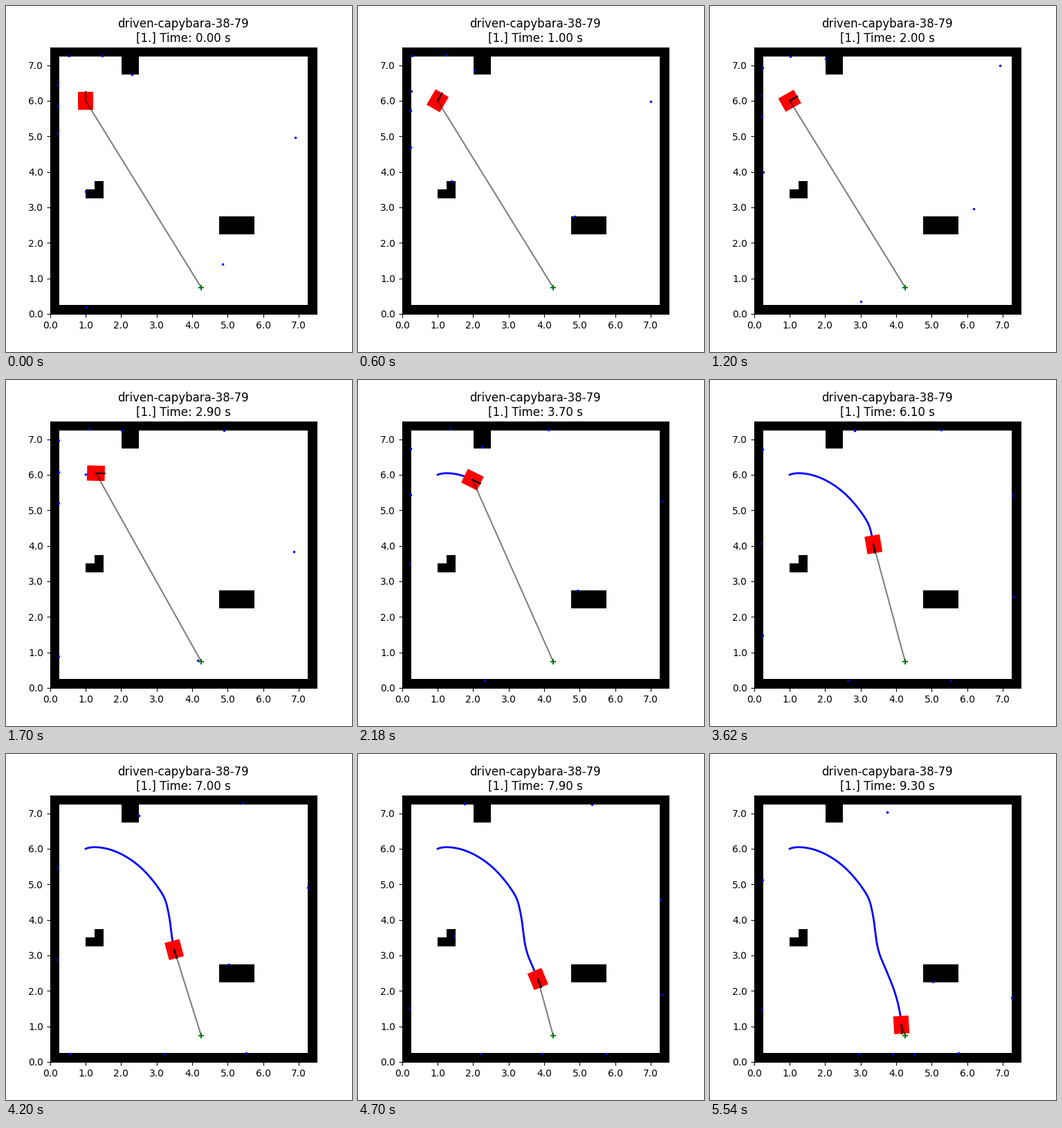
Animation of 500 by 500 pixels, one loop 5.56 s. Source, as a matplotlib script:

```python
import numpy as np
import matplotlib.pyplot as plt
from matplotlib.animation import FuncAnimation
from matplotlib.patches import Polygon

CELL, SIZE = 0.25, 30
STEPS, TICK_MS, LOOP_MS = 94, 20, 5560
DT, SUBSTEPS = 0.1, 20
MAX_RANGE, RAY_STEP = 6.0, 0.05
LENGTH, WIDTH = 0.5, 0.43
START, GOAL = (1.0, 6.0), (4.25, 0.75)
TOP_SPEED = 0.99

# heading in degrees at the moments where the turn rate changes
TURNS = {0: 90, 2: 29.5, 2.9: -1.5, 3.7: -26.5, 4.6: -46.6, 5.35: -58, 5.7: -76,
         6.35: -83.5, 6.75: -82, 7.3: -67, 7.9: -67.3, 8.4: -73, 9.3: -86.2}


def smoothstep(t, start, end):
    s = np.clip((t - start) / (end - start), 0, 1)
    return s * s * (3 - 2 * s)


def heading_at(t):
    return np.radians(np.interp(t, list(TURNS), list(TURNS.values())))


def speed_at(t):
    """Speed up after the first turn, brake a little before the goal."""
    return TOP_SPEED * (smoothstep(t, 1.8, 3.55) - 0.25 * smoothstep(t, 8.9, 9.3))


def drive():
    """Integrate speed and heading to one position per step."""
    dt = DT / SUBSTEPS
    mid = (np.arange((STEPS - 1) * SUBSTEPS) + 0.5) * dt
    h, dist = heading_at(mid), speed_at(mid) * dt
    return [start + np.append(0, np.cumsum(dist * along(h)))[::SUBSTEPS]
            for start, along in zip(START, (np.cos, np.sin))]


def build_map():
    grid = np.ones((SIZE, SIZE), dtype=int)
    grid[1:-1, 1:-1] = 0
    grid[27:29, 8:10] = 1
    grid[13, 4:6] = 1
    grid[14, 5] = 1
    grid[9:11, 19:23] = 1
    return grid


def scan(grid, x, y, heading):
    """March ten rays until each meets a wall or runs out of range."""
    angles = heading + np.linspace(-np.pi, np.pi, 10)
    dist = np.arange(0, MAX_RANGE + RAY_STEP / 2, RAY_STEP)
    px = x + np.outer(np.cos(angles), dist)
    py = y + np.outer(np.sin(angles), dist)
    col = np.clip(np.floor(px / CELL).astype(int), 0, SIZE - 1)
    row = np.clip(np.floor(py / CELL).astype(int), 0, SIZE - 1)
    hit = grid[row, col] == 1
    last = np.where(hit.any(axis=1), hit.argmax(axis=1), len(dist) - 1)
    rays = np.arange(len(angles))
    return px[rays, last], py[rays, last]


def body(x, y, heading):
    corners = np.array([(-1, -1), (1, -1), (1, 1), (-1, 1)]) * (LENGTH / 2, WIDTH / 2)
    c, s = np.cos(heading), np.sin(heading)
    return corners @ np.array([(c, s), (-s, c)]) + (x, y)


grid = build_map()
times = np.arange(STEPS) * DT
headings = heading_at(times)
xs, ys = drive()
scans = [scan(grid, *pose) for pose in zip(xs, ys, headings)]

fig, ax = plt.subplots(figsize=(5, 5), dpi=100)
extent = SIZE * CELL
ax.imshow(grid, cmap="binary", origin="lower", extent=(0, extent, 0, extent),
          interpolation="nearest")
for axis in (ax.xaxis, ax.yaxis):
    axis.set_ticks(range(8))
    axis.set_major_formatter("{x:.1f}")
title = ax.set_title("")

trail, = ax.plot([], [], color="blue", lw=2, zorder=2)
robot = ax.add_patch(Polygon(body(*START, headings[0]), facecolor="red",
                             edgecolor="none", zorder=3))
nose, = ax.plot([], [], color="black", lw=1.5, zorder=4)
to_goal, = ax.plot([], [], color="black", alpha=0.5, lw=1.5, zorder=4)
ax.plot(*GOAL, "+", color="green", ms=6, mew=1.5, zorder=5)
dots, = ax.plot([], [], ".", color="blue", ms=3, zorder=5)
ax.set_xlim(0, extent)
ax.set_ylim(0, extent)


def update(tick):
    # steps are held alternately for 20 and 100 ms
    pair, rest = divmod(tick, 6)
    k = 2 * pair + (rest > 0)
    x, y, h = xs[k], ys[k], headings[k]
    title.set_text(f"driven-capybara-38-79\n[1.] Time: {times[k]:.2f} s")
    trail.set_data(xs[:k + 1], ys[:k + 1])
    robot.set_xy(body(x, y, h))
    nose.set_data([x, x + LENGTH / 2 * np.cos(h)], [y, y + LENGTH / 2 * np.sin(h)])
    to_goal.set_data([x, GOAL[0]], [y, GOAL[1]])
    dots.set_data(*scans[k])
    return title, trail, robot, nose, to_goal, dots


anim = FuncAnimation(fig, update, frames=LOOP_MS // TICK_MS, interval=TICK_MS,
                     repeat=True, repeat_delay=0)
plt.show()
```
